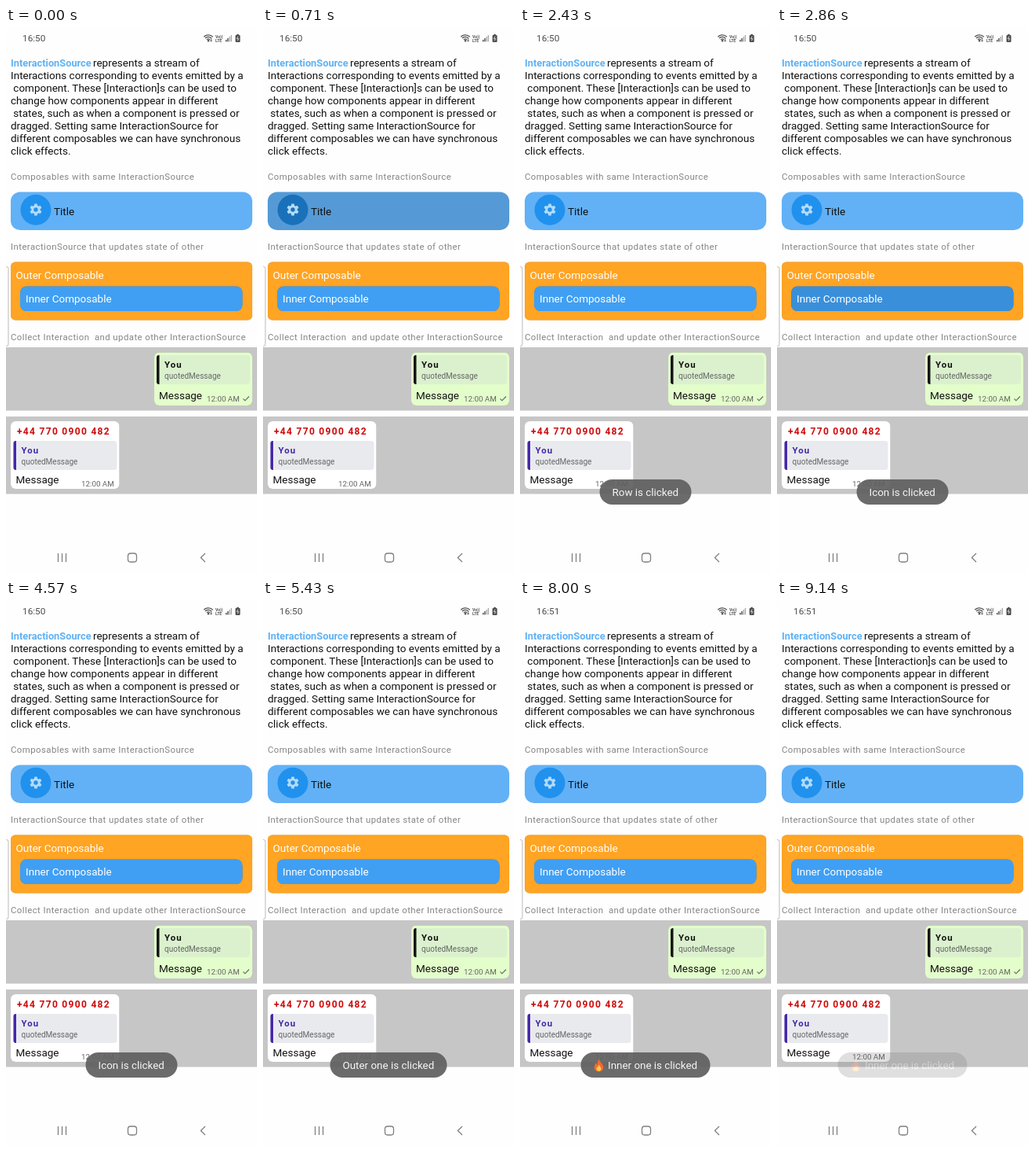
An HTML page for the animation above (9.28 s loop, 320 by 693 pixels).

```html
<!DOCTYPE html>
<html lang="en">
<head>
<meta charset="utf-8">
<title>InteractionSource demo</title>
<style>
html, body { margin: 0; width: 100%; height: 100%; overflow: hidden; background: #fefefe; }
svg { display: block; width: 100%; height: 100%; }
text { font-family: Roboto, sans-serif; white-space: pre; }
.raised { filter: drop-shadow(0 .7px .7px rgba(0, 0, 0, .3)); }
</style>
</head>
<body>
<svg id="stage" viewBox="0 0 320 693"></svg>
<script>
const LOOP = 9280;
const stage = document.getElementById('stage');

const clamp = v => Math.max(0, Math.min(1, v));
const ease = v => 1 - (1 - clamp(v)) ** 3;

function el(tag, attrs, parent = stage) {
  const node = document.createElementNS('http://www.w3.org/2000/svg', tag);
  for (const k in attrs) node.setAttribute(k, attrs[k]);
  parent.appendChild(node);
  return node;
}
const box = (x, y, w, h, rx, fill, more = {}, parent) =>
  el('rect', { x, y, width: w, height: h, rx, fill, ...more }, parent);
const card = (x, y, w, h, rx, fill) => box(x, y, w, h, rx, fill, { class: 'raised' });
const path = (d, more, parent) => el('path', { d, fill: 'none', ...more }, parent);
function text(x, y, str, size, fill, more = {}, parent) {
  const node = el('text', { x, y, 'font-size': size, fill, ...more }, parent);
  node.textContent = str;
  return node;
}
const body = (x, y, str, fill = '#111') => text(x, y, str, 13.5, fill);
const caption = (y, str) => text(6, y, str, 11.4, '#858585', { 'letter-spacing': .43 });

function drawStatusBar() {
  const dark = '#4c4c4c';
  const clock = text(21, 17, '16:50', 11.8, dark);
  for (const r of [3, 5.7, 8.2]) {
    const a = r * .7;
    path(`M${258 - a} ${17 - a}A${r} ${r} 0 0 1 ${258 + a} ${17 - a}`, { stroke: dark, 'stroke-width': 1.2 });
  }
  el('circle', { cx: 258, cy: 16.2, r: 1.2, fill: dark });
  path('M261.5 13v4M260.2 15.7l1.3 1.5 1.3-1.5', { stroke: dark, 'stroke-width': .8 });
  const tiny = { 'font-weight': 700 };
  text(267, 12.5, 'Vo))', 5, dark, tiny);
  text(267, 17.6, 'LTE', 5, dark, tiny);
  for (let i = 0; i < 4; i++)
    box(280 + i * 2.2, 15 - i * 2, 1.4, 2.4 + i * 2, 0, i < 2 ? dark : '#aaa');
  box(292.5, 9, 6, 9, 1, dark);
  box(294.3, 7.8, 2.4, 1.5, 0, dark);
  path('M296 10.6l-1.7 3h2.2l-1.2 2.7', { stroke: '#fff', 'stroke-width': .8 });
  return clock;
}

function drawIntro() {
  text(6, 48.5, 'InteractionSource', 12.8, '#5fb2f4', { 'font-weight': 700 });
  body(111, 48.5, 'represents a stream of');
  ['Interactions corresponding to events emitted by a',
    ' component. These [Interaction]s can be used to',
    'change how components appear in different',
    ' states, such as when a component is pressed or',
    'dragged. Setting same InteractionSource for',
    'different composables we can have synchronous',
    'click effects.'
  ].forEach((line, i) => body(6, 64.5 + i * 16, line));
}

function drawGear(cx, cy) {
  const g = el('g', { transform: `translate(${cx} ${cy})` });
  for (let i = 0; i < 6; i++)
    box(-1.9, -7.6, 3.8, 4, .7, '#b3dcfa', { transform: `rotate(${i * 60})` }, g);
  el('circle', { r: 4.2, fill: 'none', stroke: '#b3dcfa', 'stroke-width': 3 }, g);
}

// Dark overlay clipped to a rounded box, spreading from the touch point.
let clips = 0;
function ripple(x, y, w, h, rx, alpha, presses) {
  const id = 'clip' + clips++;
  box(x, y, w, h, rx, '#000', {}, el('clipPath', { id }));
  const g = el('g', { 'clip-path': `url(#${id})` });
  const dot = el('circle', { fill: '#000', opacity: 0 }, g);
  const full = Math.hypot(w, h);
  return t => {
    const p = presses.find(p => t >= p.down && t < p.up + 150);
    if (!p) return dot.setAttribute('opacity', 0);
    dot.setAttribute('cx', p.x);
    dot.setAttribute('cy', p.y);
    dot.setAttribute('r', full * (.3 + .7 * ease((t - p.down) / 225)));
    dot.setAttribute('opacity', alpha * clamp((t - p.down) / 75) * clamp((p.up + 150 - t) / 150));
  };
}

function drawQuote(x, y, w, fill, accent) {
  box(x, y, w, 37, 4, fill);
  path(`M${x + 3.5} ${y}v37h-.5a3 3 0 0 1-3-3v-31a3 3 0 0 1 3-3z`, { fill: accent });
  text(x + 10, y + 15.6, 'You', 11.4, accent, { 'font-weight': 700, 'letter-spacing': 1 });
  text(x + 10, y + 29.8, 'quotedMessage', 10, '#666');
}

function drawMessages() {
  const grey = '#c6c6c6';
  const stamp = (x, y) => text(x, y, '12:00 AM', 9.8, '#666');
  box(0, 406, 320, 80.5, 0, grey);
  box(0, 494, 320, 98.5, 0, grey);

  card(189, 412.5, 125, 67.5, 6, '#e3fdcb');
  drawQuote(192, 416, 119, '#dbf1ce', '#111');
  body(195, 471.5, 'Message');
  stamp(256, 475);
  path('M302.5 471.5l2.3 2.3 5-5.3', { stroke: '#666', 'stroke-width': 1.1 });

  card(6, 500, 138.5, 86, 6, '#fff');
  text(14, 517, '+44 770 0900 482', 12, '#cf0a0a', { 'font-weight': 700, 'letter-spacing': 1.3 });
  drawQuote(9.5, 525, 132, '#e8eaee', '#4527a8');
  body(12.5, 579, 'Message');
  stamp(96, 582.5);
}

function drawNavBar() {
  const line = { stroke: '#808080', 'stroke-width': 1.3 };
  path('M66.5 668v11M71.5 668v11M76.5 668v11', line);
  box(155.5, 668, 11, 11, 3.2, 'none', line);
  path('M254 668l-5.6 5.5 5.6 5.5', line);
}

// Newer toasts sit below the one that is fading out.
const toastLayer = el('g', {});
function toast(str, w, fadeIn, fadeOut, fire) {
  const g = el('g', { opacity: 0 });
  toastLayer.prepend(g);
  box(160 - w / 2, 574, w, 32, 16, '#606060', { 'fill-opacity': .93 }, g);
  text(fire ? 112 : 176 - w / 2, 595, str, 13.4, '#f6f6f6', {}, g);
  if (fire) {
    path('M100.5 582.5c.6 3.6 5.8 5.6 5.8 10.4 0 3.4-2.5 5.6-5.8 5.6s-5.8-2.3-5.8-5.7c0-2.5 1.4-4 2.2-5.6.4 1.3.9 1.8 1.5 2.2.1-2.8 1.1-5.1 2.1-6.9z', { fill: '#f26a2e' }, g);
    path('M100.8 589.5c.3 2 2.7 2.9 2.7 5.2 0 1.8-1.3 3-3 3s-3-1.1-3-2.9c0-1.3.8-2 1.2-2.8.3.7.6.9.9 1 .1-1.4.6-2.5 1.2-3.5z', { fill: '#ffc94a' }, g);
  }
  const [a, b] = fadeIn, [c, d] = fadeOut;
  return t => g.setAttribute('opacity', Math.min(clamp((t - a) / (b - a)), clamp((d - t) / (d - c))));
}

const clock = drawStatusBar();
drawIntro();

caption(192.5, 'Composables with same InteractionSource');
box(6, 208.5, 308, 48.5, 12, '#62b1f6');
el('circle', { cx: 38, cy: 231.3, r: 19.5, fill: '#2191ee' });
const rowPresses = [{ down: 500, up: 820, x: 170, y: 234 }, { down: 1130, up: 1430, x: 46, y: 237 }];
const iconPresses = rowPresses.map(p => ({ ...p, x: 46 }));
const updates = [
  ripple(6, 208.5, 308, 48.5, 12, .13, rowPresses),
  ripple(18.5, 211.8, 39, 39, 19.5, .1, iconPresses)
];
drawGear(38, 231);
body(61, 238, 'Title');
const touch = el('circle', { cx: 46.5, cy: 237, r: 7.5, fill: '#fff', opacity: 0 });

caption(282, 'InteractionSource that updates state of other');
card(6, 297.5, 308, 74, 6, '#ffa423');
body(12.5, 318.5, 'Outer Composable', '#fff');
card(18, 328.5, 283.5, 31.5, 8, '#409ff3');
updates.push(ripple(18, 328.5, 283.5, 31.5, 8, .1, [
  { down: 2650, up: 2960, x: 200, y: 320 },
  { down: 5850, up: 6200, x: 200, y: 345 }
]));
body(25, 349, 'Inner Composable', '#fff');
path('M-1 303.5h1.5a2.5 2.5 0 0 1 2.5 2.5v96a2.5 2.5 0 0 1-2.5 2.5h-1.5', { fill: '#fff', stroke: '#aaa', 'stroke-width': .8 });

caption(397, 'Collect Interaction  and update other InteractionSource');
drawMessages();
drawNavBar();

stage.appendChild(toastLayer);
updates.push(
  toast('Row is clicked', 117, [850, 1100], [2500, 2501]),
  toast('Icon is clicked', 117, [2500, 2501], [4640, 4870]),
  toast('Outer one is clicked', 149, [4640, 4900], [6720, 6950]),
  toast('Inner one is clicked', 165, [6690, 6980], [8840, 9220], true)
);

function render(t) {
  updates.forEach(update => update(t));
  touch.setAttribute('opacity', t >= 1130 && t < 1430 ? .28 : 0);
  clock.textContent = t < 7140 ? '16:50' : '16:51';
}

const start = performance.now();
function tick() {
  render((performance.now() - start) % LOOP);
  requestAnimationFrame(tick);
}
tick();
</script>
</body>
</html>
```
